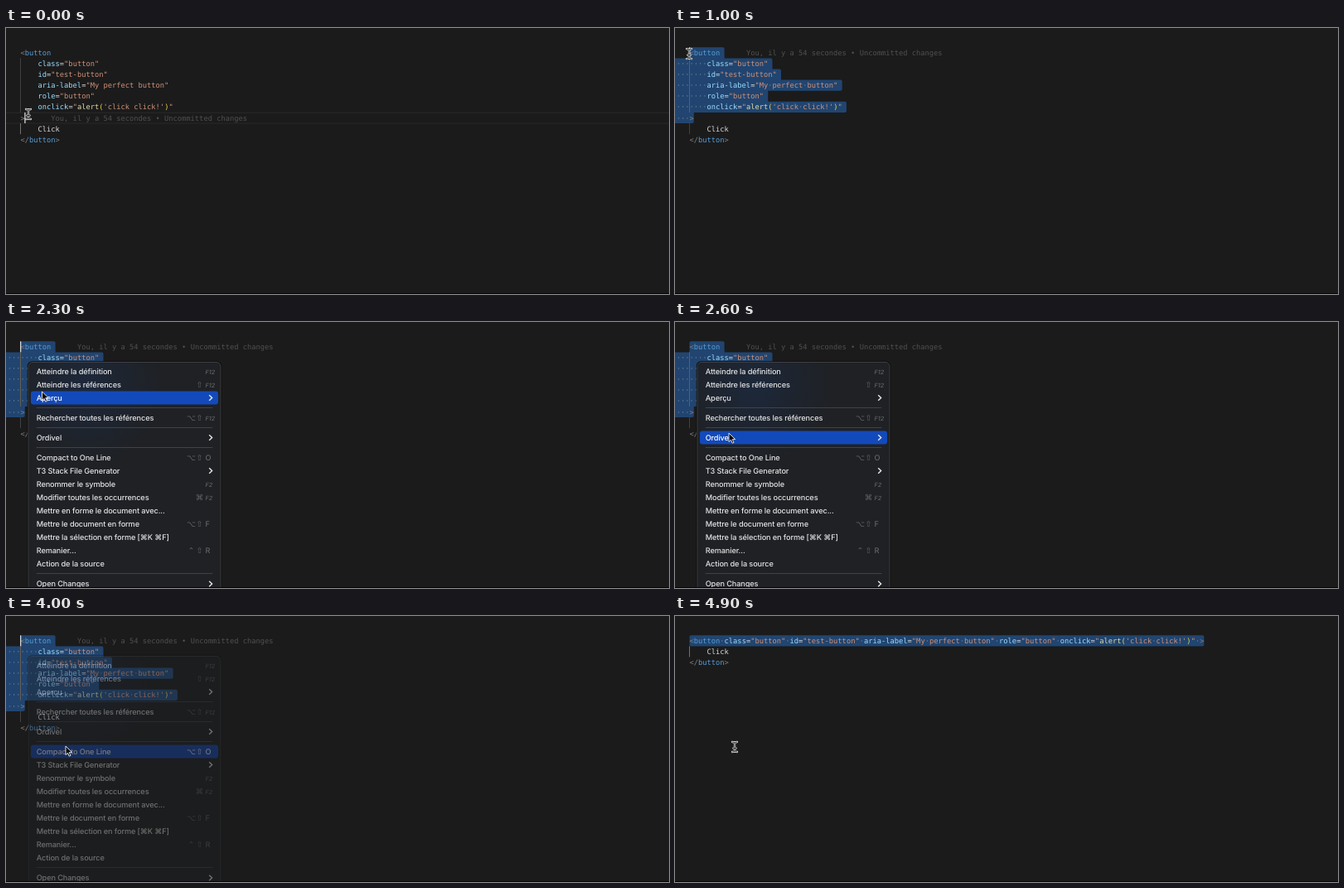
These frames come from a looping animation (800x321 px, 5 s). An HTML page:

```html
<!DOCTYPE html>
<html lang="fr">
<head>
<meta charset="utf-8">
<title>Compact to One Line</title>
<style>
  html, body { margin: 0; width: 100%; height: 100%; overflow: hidden; background: #1b1b1b; }
  svg { display: block; }
  text { white-space: pre; text-rendering: geometricPrecision; }
  .code text { font: 8.74px "DejaVu Sans Mono", monospace; }
  .menu text { font: 500 9.2px Inter, "DejaVu Sans", sans-serif; letter-spacing: -.12px; }
  .menu .sym { font: 9.5px "DejaVu Sans", sans-serif; text-anchor: middle; letter-spacing: 0; }
  .menu .fn { font: italic 500 7.2px Inter, sans-serif; letter-spacing: 0; }
</style>
</head>
<body>
<svg width="800" height="321" viewBox="0 0 800 321">
  <defs>
    <radialGradient id="tint" gradientUnits="userSpaceOnUse" cx="95" cy="78" r="95">
      <stop offset="0" stop-color="#1c2b44" stop-opacity=".7"/>
      <stop offset="1" stop-color="#1c2b44" stop-opacity="0"/>
    </radialGradient>
  </defs>
  <rect width="800" height="321" fill="#1b1b1b"/>
  <g id="scene"></g>
  <rect y="320" width="800" height="1" fill="#050505"/>
</svg>
<script>
const LOOP = 5000, STEP = 100, COMPACT_AT = 4200;
const LEFT = 17.5, CHAR = 5.262, TOP = 23.3, ROW = 13.1;
const GREY = '#808080', TAG = '#569cd6', ATTR = '#9cdcfe', PLAIN = '#d8d8d8',
      STR = '#ce9178', FUNC = '#dcdcaa', PAREN = '#f0d040';

const colX = c => LEFT + c * CHAR;
const rowY = r => TOP + r * ROW;
const esc = s => s.replace(/&/g, '&amp;').replace(/</g, '&lt;').replace(/>/g, '&gt;');
const text = (x, y, s, fill, cls = '') =>
  `<text x="${x.toFixed(2)}" y="${y.toFixed(2)}" fill="${fill}" class="${cls}">${esc(s)}</text>`;
const rect = (x, y, w, h, fill, rx = 0) =>
  `<rect x="${x}" y="${y}" width="${w}" height="${h}" fill="${fill}" rx="${rx}"/>`;

// Code model: each line has a start column and [colour, text] tokens.
const attr = (name, value) => [[ATTR, name], [PLAIN, '='], [STR, `"${value}"`]];
const open = [[GREY, '<'], [TAG, 'button']];
const close = [[GREY, '</'], [TAG, 'button'], [GREY, '>']];
const end = [[GREY, '>']];
const attrs = [
  attr('class', 'button'),
  attr('id', 'test-button'),
  attr('aria-label', 'My perfect button'),
  attr('role', 'button'),
  [[ATTR, 'onclick'], [PLAIN, '='], [STR, '"'], [FUNC, 'alert'], [PAREN, '('],
   [STR, "'click click!'"], [PAREN, ')'], [STR, '"']]
];
const line = (start, tokens) => {
  const body = tokens.map(t => t[1]).join('');
  return { start, tokens, body, len: start + body.length };
};
const label = line(4, [[PLAIN, 'Click']]);
const tall = [line(0, open), ...attrs.map(a => line(4, a)), line(0, end), label, line(0, close)];
const space = [PLAIN, ' '];
const flat = [
  line(0, [...open, ...attrs.flatMap(a => [space, ...a]), space, ...end]),
  label, line(0, close)
];

function codeLine(l, row) {
  let col = l.start;
  return l.tokens.map(([fill, s]) => {
    const out = text(colX(col), rowY(row) + 9.6, s, fill);
    col += s.length;
    return out;
  }).join('');
}

// Selection from (row, col) to (endRow, endCol), with dots for its spaces.
function selection(lines, row, col, endRow, endCol) {
  const fill = '#214570';
  let boxes = '', dots = '', last = null;
  for (let r = row; r <= endRow; r++) {
    const l = lines[r];
    const from = r === row ? col : -4;
    const to = r === endRow ? endCol : l.len + 1;
    const a = colX(from), b = colX(to), y = rowY(r);
    boxes += rect(a, y, Math.max(0, b - a), ROW + .1, fill, 2);
    if (last) {
      const x = Math.max(a, last.a), right = Math.min(b, last.b);
      if (right > x) boxes += rect(x, y - 2, right - x, 4, fill);
    }
    last = { a, b };
    for (let c = from; c < Math.min(to, l.len); c++) {
      if (c < l.start || l.body[c - l.start] === ' ')
        dots += text(colX(c), y + 9.6, '·', '#6d8196');
    }
  }
  return boxes + dots;
}

const guide = (from, to, fill) => rect(17, rowY(from), 1, (to - from) * ROW, fill);
const caret = (row, col) => rect(colX(col) - .5, rowY(row), 1.3, ROW, '#d6d6d6');
const blame = row => text(colX(tall[row].len + 6), rowY(row) + 9.6,
  'You, il y a 54 secondes • Uncommitted changes', '#505050');

// Menu rows: label, centre y, shortcut ('>' opens a submenu).
const items = [
  ['Atteindre la définition', 59.5, 'F12'],
  ['Atteindre les références', 75.5, '⇧ F12'],
  ['Aperçu', 91.5, '>'],
  ['Rechercher toutes les références', 115.5, '⌥ ⇧ F12'],
  ['Ordivel', 139.5, '>'],
  ['Compact to One Line', 163.5, '⌥ ⇧ O'],
  ['T3 Stack File Generator', 179.5, '>'],
  ['Renommer le symbole', 195.5, 'F2'],
  ['Modifier toutes les occurrences', 211.5, '⌘ F2'],
  ['Mettre en forme le document avec...', 227.5, ''],
  ['Mettre le document en forme', 243.5, '⌥ ⇧ F'],
  ['Mettre la sélection en forme [⌘K ⌘F]', 259.5, ''],
  ['Remanier...', 275.5, '⌃ ⇧ R'],
  ['Action de la source', 291.5, ''],
  ['Open Changes', 316, '>']
];
const rules = [103.5, 127.5, 151.5, 303.5];

function shortcut(keys, y, fill) {
  if (!keys) return '';
  if (keys === '>')
    return `<path d="M245.2 ${y - 3.3}l3.4 3.3l-3.4 3.3" fill="none" stroke="#e8e8ea" stroke-width="1.4"/>`;
  const parts = keys.split(' ');
  const key = parts.pop();
  const mods = parts.reverse().map((m, i) => text(233.5 - i * 10, y + 3.4, m, fill, 'sym')).join('');
  return mods + text(240.5, y + 3.3, key, fill, key.length > 1 ? 'fn' : '');
}

function menu(pointerY, opacity) {
  const body = items.map(([name, y, keys]) => {
    const hot = Math.abs(pointerY - y) <= 8;
    return (hot ? rect(30, y - 8, 226, 16, '#134abb', 3) : '') +
      text(36.7, y + 3.3, name, hot ? '#fff' : '#e4e4e6') +
      shortcut(keys, y, hot ? '#f0f2f8' : '#616367');
  }).join('');
  return `<g class="menu" opacity="${opacity}">
    <rect x="26.5" y="48" width="233" height="290" rx="5" fill="#1f2124" stroke="#0c0c0c" stroke-width="1.6"/>
    <rect x="27" y="48.5" width="232" height="290" rx="5" fill="url(#tint)" stroke="#4b4c4f" stroke-width=".8"/>
    ${rules.map(y => rect(36.7, y - .4, 212.6, .9, '#45474b')).join('')}${body}</g>`;
}

// Pointer stops: time, x, y.
const path = [
  [0, 27, 104], [100, 26, 98], [200, 22, 82], [300, 18, 60], [400, 17, 43], [500, 17, 34],
  [1200, 17, 30], [1700, 26, 45], [2000, 27, 48], [2200, 34, 62], [2400, 53, 106],
  [2600, 65, 134], [2900, 72, 157], [4100, 72, 157], [4200, 72, 158], [5000, 72, 158]
];
function pointerAt(t) {
  const i = path.findIndex(p => p[0] > t);
  const [t0, x0, y0] = path[i - 1], [t1, x1, y1] = path[i];
  const k = (t - t0) / (t1 - t0);
  return { x: x0 + (x1 - x0) * k, y: y0 + (y1 - y0) * k };
}
function beam({ x, y }) {
  const d = 'M-3-6Q-.4-6 0-4.8Q.4-6 3-6M0-4.8V4.8M-3 6Q-.4 6 0 4.8Q.4 6 3 6M-1.6 1.6H1.6';
  return `<g transform="translate(${x} ${y})" fill="none" stroke-linecap="round">
    <path d="${d}" stroke="#f2f2f2" stroke-width="2.3"/><path d="${d}" stroke="#111" stroke-width=".9"/></g>`;
}
const arrow = ({ x, y }) => `<path transform="translate(${x} ${y})"
  d="M0 0V10.6L2.5 8.3L4.2 12.2L6 11.4L4.3 7.6H7.7Z" fill="#080808" stroke="#f4f4f4" stroke-width=".9"/>`;

function before(t, pointer) {
  const dragging = t > 0;
  const row = dragging ? Math.min(6, Math.max(0, Math.floor((pointer.y - TOP) / ROW))) : 6;
  const col = dragging && row < 6 ? Math.max(0, Math.round((pointer.x - LEFT) / CHAR)) : 1;
  const from = t >= 500 ? [0, 0] : [row, col];
  let out = '';
  if (!dragging) {
    out += rect(0, 101.8, 800, 1, '#282828') + rect(0, 114.5, 800, 1, '#282828') + blame(6);
  } else {
    out += selection(tall, ...from, 6, 1);
  }
  out += guide(1, 6, dragging ? '#655d54' : '#404040') + guide(7, 8, dragging ? '#404040' : '#707070');
  out += tall.map(codeLine).join('');
  if (t >= 1000) out += blame(0);
  if ((t + 210) % 1000 < 540) out += caret(...from);
  return out;
}
function after(t) {
  return selection(flat, 0, 0, 0, flat[0].len) + guide(1, 2, '#707070') +
    flat.map(codeLine).join('') + (t < COMPACT_AT + 500 ? caret(0, flat[0].len) : '');
}

const scene = document.getElementById('scene');
function draw(t) {
  const pointer = pointerAt(t);
  const done = t >= COMPACT_AT;
  let out = `<g class="code">${done ? after(t) : before(t, pointer)}</g>`;
  if (t >= 2000 && !done) {
    const fade = t < 3900 ? 1 : Math.max(.1, .74 - (t - 3900) * .0033);
    out += menu(pointer.y, fade) + arrow(pointer);
  } else if (t < 1800 || done) {
    out += beam(pointer);
  }
  scene.innerHTML = out;
}

const begin = performance.now();
let shown = -1;
function tick() {
  const t = Math.floor((performance.now() - begin) % LOOP / STEP) * STEP;
  if (t !== shown) draw(shown = t);
  requestAnimationFrame(tick);
}
tick();
</script>
</body>
</html>
```
